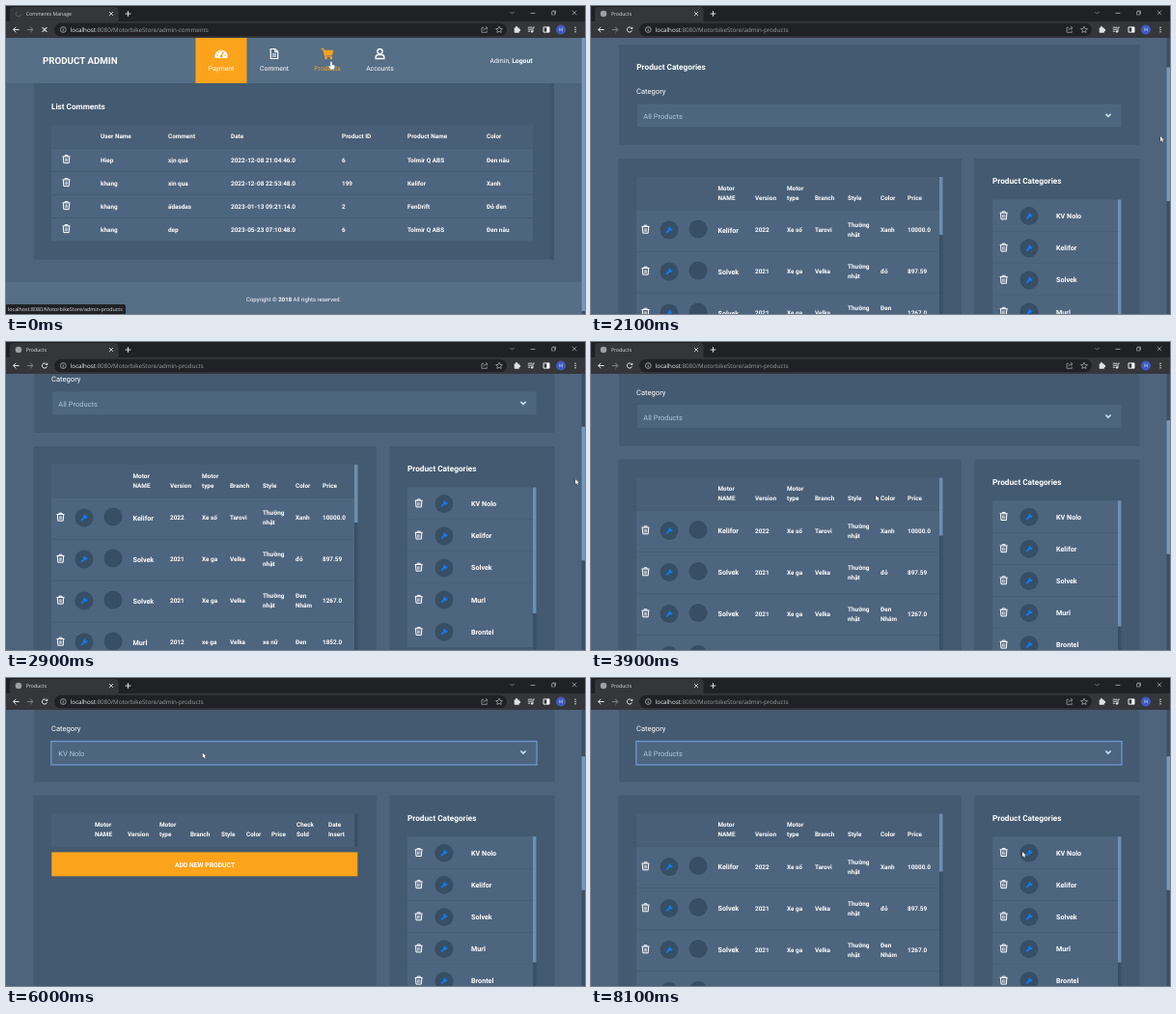
Write an HTML page with a canvas that moves like this. It is 600 by 319 pixels and loops after 8200 ms.

```html
<!DOCTYPE html>
<html lang="en">
<head>
<meta charset="utf-8">
<title>Product admin</title>
<style>
html, body { margin: 0; width: 100%; height: 100%; overflow: hidden; background: #4d647c; }
canvas { display: block; width: 600px; height: 319px; }
</style>
</head>
<body>
<canvas id="stage"></canvas>
<script>
const W = 600, H = 319, LOOP = 8200, TOP = 33;
const canvas = document.getElementById('stage');
const ctx = canvas.getContext('2d');
const ratio = window.devicePixelRatio || 1;
canvas.width = W * ratio;
canvas.height = H * ratio;
ctx.textRendering = 'geometricPrecision';

const C = {
  page: '#4d647c', block: '#435a70', nav: '#566e86', row: '#4e657f', head: '#485f77',
  line: '#435a72', disc: '#384e64', thumb: '#6d8fb0', track: '#3a5066', pageThumb: '#7699be',
  orange: '#fca31c', blue: '#0d7df2', pale: '#acc6de', white: '#ffffff',
  strip: '#202124', bar: '#35363a', grey: '#9aa0a6', dim: '#b4b7bb', light: '#dfe1e5'
};
const ROBOTO = 'Roboto, sans-serif', OPEN = '"Open Sans", sans-serif';

const options = ['All Products', 'KV Nolo', 'Kelifor', 'Solvek', 'Murl', 'Brontel',
  'FenDrift', 'Plyma', 'Zunel', 'Kelifor TZ', 'Tolmir Q ABS', 'KV'];
const bikes = [
  ['Kelifor', '2022', 'Xe số', 'Tarovi', 'Thường|nhật', 'Xanh', '10000.0'],
  ['Solvek', '2021', 'Xe ga', 'Velka', 'Thường|nhật', 'đỏ', '897.59'],
  ['Solvek', '2021', 'Xe ga', 'Velka', 'Thường|nhật', 'Đen|Nhám', '1267.0'],
  ['Murl', '2012', 'xe ga', 'Velka', 'xe nữ', 'Đen', '1852.0']
];
const comments = [
  ['Hiep', 'xịn quá', '2022-12-08 21:04:46.0', '6', 'Tolmir Q ABS', 'Đen nâu'],
  ['khang', 'xin qua', '2022-12-08 22:53:48.0', '199', 'Kelifor', 'Xanh'],
  ['khang', 'ấdasdas', '2023-01-13 09:21:14.0', '2', 'FenDrift', 'Đỏ đen'],
  ['khang', 'dep', '2023-05-23 07:10:48.0', '6', 'Tolmir Q ABS', 'Đen nâu']
];
const heads = ['Motor|NAME', 'Version', 'Motor|type', 'Branch', 'Style', 'Color', 'Price'];
const fullCols = [131.5, 170, 203, 232, 266, 300, 328];
const emptyCols = [92, 126, 159, 191, 223, 249, 275, 301, 334];
const commentCols = [98, 168, 233, 348, 416, 498];

// Keyframes: [time, value, ...]
const scrollKeys = [[1400, 0], [2100, 63], [2600, 113], [2900, 113], [3300, 99.4]];
const mouseKeys = [
  [0, 337, 58], [300, 345, 62], [1200, 590, 94], [1500, 590, 94], [2100, 590, 135],
  [2900, 590, 142], [3600, 330, 276], [4100, 272, 81], [4500, 272, 81], [5000, 288, 165],
  [5300, 287.5, 165], [5600, 204, 104], [5900, 203.7, 77.5], [6300, 203.7, 77.5],
  [6900, 130, 93], [7100, 130, 93], [7800, 440, 180], [8100, 447, 180]
];

function sample(keys, t) {
  if (t <= keys[0][0]) return keys[0].slice(1);
  for (let i = 1; i < keys.length; i++) {
    const a = keys[i - 1], b = keys[i];
    if (t <= b[0]) {
      const p = (t - a[0]) / (b[0] - a[0]);
      return a.slice(1).map((v, k) => v + (b[k + 1] - v) * p);
    }
  }
  return keys[keys.length - 1].slice(1);
}

function box(x, y, w, h, color) {
  ctx.fillStyle = color;
  ctx.fillRect(x, y, w, h);
}

function round(x, y, w, h, r, color) {
  ctx.fillStyle = color;
  ctx.beginPath();
  ctx.roundRect(x, y, w, h, r);
  ctx.fill();
}

function disc(x, y, r, color) {
  ctx.fillStyle = color;
  ctx.beginPath();
  ctx.arc(x, y, r, 0, 7);
  ctx.fill();
}

function ring(x, y, r, color, width = 0.9, from = 0, to = Math.PI * 2) {
  ctx.strokeStyle = color;
  ctx.lineWidth = width;
  ctx.beginPath();
  ctx.arc(x, y, r, from, to);
  ctx.stroke();
}

function path(d, x, y, color, width = 0) {
  ctx.save();
  ctx.translate(x, y);
  const p = new Path2D(d);
  if (width) {
    ctx.strokeStyle = color;
    ctx.lineWidth = width;
    ctx.stroke(p);
  } else {
    ctx.fillStyle = color;
    ctx.fill(p);
  }
  ctx.restore();
}

// y is the middle of the capital letters
function text(s, x, y, size, opt = {}) {
  ctx.font = `${opt.weight || 400} ${size}px ${opt.font || ROBOTO}`;
  ctx.fillStyle = opt.color || C.white;
  ctx.textAlign = opt.align || 'left';
  ctx.fillText(s, x, y + size * 0.355);
  return ctx.measureText(s).width;
}

const bold = (s, x, y, size = 6.4, align = 'left') => text(s, x, y, size, { weight: 700, align });

function lines(s, x, y, size) {
  const parts = s.split('|');
  parts.forEach((p, i) => bold(p, x, y + (i - (parts.length - 1) / 2) * 10, size));
}

function trash(x, y) {
  path('M-3.2-2.4L-2.7 4H2.7L3.2-2.4M-4-2.7H4M-1.5-2.9V-4H1.5V-2.9', x, y, C.white, 1);
  path('M-1.2-1V2.7M0-1V2.7M1.2-1V2.7', x, y, C.white, 0.6);
}

function wrench(x, y) {
  disc(x, y, 9.5, C.disc);
  path('M-2.9 2.9L1.2-1.2', x, y, C.blue, 1.7);
  path('M3.3-1.7A2.1 2.1 0 1 1 1.7-3.3L1.3-1.9L1.9-1.3Z', x, y, C.blue);
}

function drawNav(hover, y) {
  box(0, y, W, 47, C.nav);
  bold('PRODUCT ADMIN', 38, y + 24, 9.75);
  box(196.5, y, 53, 47, C.orange);
  const hot = hover ? C.orange : C.white;
  const iy = y + 16.5;

  path('M-6.3 4.5A6.6 6.6 0 1 1 6.3 4.5Z', 223, iy, C.white);
  [[-4, 1.5], [-2.9, -1.8], [0, -3.2], [4, 1.5]].forEach(p => disc(223 + p[0], iy + p[1], 0.8, C.orange));
  path('M0 2.4L2.4-2.2', 223, iy, C.orange, 1.1);
  disc(223, iy + 2.6, 1.5, C.orange);

  path('M-3.7-5H1L3.7-2.3V5H-3.7ZM0.8-5V-2H3.7', 278, iy, C.white, 1.2);
  path('M-2 0.4H2M-2 2.5H2', 278, iy, C.white, 1);

  path('M-6.3-5H-4.2L-2.2 2.7H4.6', 333, iy, hot, 1.3);
  path('M-4-3.8H6.3L5 1.5H-2.8Z', 333, iy, hot);
  disc(331.6, iy + 4.4, 1.3, hot);
  disc(337, iy + 4.4, 1.3, hot);

  ring(387.5, iy - 2.4, 2.6, C.white, 1.3);
  path('M-4.4 5V3.8C-4.4 2-3.2 1-1.7 1H1.7C3.2 1 4.4 2 4.4 3.8V5Z', 387.5, iy, C.white, 1.3);

  const label = (s, x, color) => text(s, x, y + 32, 6.8, { align: 'center', color });
  label('Payment', 223, C.white);
  label('Comment', 278, C.white);
  label('Products', 333, hot);
  label('Accounts', 387.5, C.white);
  const w = text('Admin, ', 501.5, y + 24, 6.8);
  bold('Logout', 501.5 + w, y + 24, 6.8);
}

function drawComments() {
  drawNav(true, TOP);
  box(29, 80, 539, 182.5, C.block);
  box(564, 80, 4, 182.5, '#3e556b');
  bold('List Comments', 47, 104, 8.2);
  box(47, 123, 499, 24.5, C.head);
  ['User Name', 'Comment', 'Date', 'Product ID', 'Product Name', 'Color']
    .forEach((s, i) => bold(s, commentCols[i], 135));
  comments.forEach((row, r) => {
    const y = 159.3 + r * 24;
    box(47, y - 12, 499, 24, C.row);
    box(47, y - 12.2, 499, 0.7, C.line);
    trash(62.5, y - 0.7);
    row.forEach((s, i) => bold(s, commentCols[i], y));
  });
  box(0, 286, W, 33, C.nav);
  let x = 249;
  x += text('Copyright © ', x, 303.5, 6);
  x += text('2018', x, 303.5, 6, { weight: 700 });
  text(' All rights reserved.', x, 303.5, 6);
  box(596.5, TOP, 3.5, 286, C.track);
  box(596.5, TOP, 3.5, 283, C.pageThumb);
}

function drawSelect(s, value, focused) {
  const y = 164.5 - s;
  box(48, y, 501.5, 23.7, C.row);
  if (focused) {
    ctx.strokeStyle = '#7199d2';
    ctx.lineWidth = 1.3;
    ctx.strokeRect(46.8, y + 0.5, 503.2, 24.3);
  }
  text(value, 54.3, y + 12.8, 7.5, { color: C.pale });
  path('M-2.6-1.3L0 1.3L2.6-1.3', 536, y + 11.7, '#d5e3ef', 1.5);
}

function drawHeads(names, cols, s) {
  box(47, 240 - s, 314, 34.5, C.head);
  names.forEach((name, i) => {
    const parts = name.split('|');
    parts.forEach((p, k) => bold(p, cols[i], 261.5 - s - (parts.length - 1 - k) * 10));
  });
}

function drawBikes(s) {
  drawHeads(heads, fullCols, s);
  bikes.forEach((row, r) => {
    const y = 295 - s + r * 43;
    box(47, y - 21, 314, 43, C.row);
    box(47, y - 21.2, 314, 0.7, C.line);
    trash(56.5, y - 0.8);
    wrench(81, y);
    disc(111, y - 1, 9.5, C.disc);
    row.forEach((v, i) => lines(v, fullCols[i], y, i ? 6.4 : 7.2));
  });
  box(361, 240 - s, 3.5, 260, C.track);
  box(361, 240 - s, 3.5, 60, C.thumb);
}

function drawEmpty(s) {
  drawHeads(heads.concat('Check|Sold', 'Date|Insert'), emptyCols, s);
  box(361, 240 - s, 3.5, 34.5, C.track);
  box(47.3, 279.8 - s, 317, 24.9, C.orange);
  bold('ADD NEW PRODUCT', 206, 292.5 - s, 6.8, 'center');
}

function drawList(choice) {
  box(47.5, 89.7, 502, 112.5, C.row);
  options.forEach((name, i) => {
    const y = 93.8 + i * 9.38;
    if (i === choice) box(47.5, y - 4.7, 502, 9.4, '#1887f5');
    text(name, 55, y, 7.5, { color: i === choice ? C.white : '#bdd1e3' });
  });
}

function drawProducts(t) {
  const s = sample(scrollKeys, t)[0];
  const filtered = t >= 5800 && t < 7200;
  const chosen = t >= 5600 && t < 6900 ? options[1] : options[0];
  drawNav(false, TOP - s);

  box(29, 103 - s, 539.5, 104, C.block);
  bold('Product Categories', 47.3, 126.5 - s, 8.24);
  text('Category', 47, 151.5 - s, 7.6);
  drawSelect(s, chosen, t >= 4300);

  box(28.5, 221 - s, 355.5, 320, C.block);
  if (filtered) drawEmpty(s); else drawBikes(s);

  box(397.5, 221 - s, 171, 320, C.block);
  bold('Product Categories', 416, 244.5 - s, 8.24);
  options.slice(1, 6).forEach((name, i) => {
    const y = 280.6 - s + i * 33.15;
    box(416, y - 17, 130, 33.2, C.row);
    box(416, y + 15.9, 130, 0.7, C.line);
    trash(427.7, y - 0.7);
    wrench(454, y);
    bold(name, 482, y, 7.2);
  });
  box(546, 263.5 - s, 3.5, 240, C.track);
  box(546, 263.5 - s, 3.5, 130.5, C.thumb);

  if (t >= 4500 && t < 5600) drawList(t < 5100 ? 0 : 1);
  if (t >= 6300 && t < 6900) drawList(t < 6600 ? 1 : 0);

  box(596.5, TOP, 3.5, 286, C.track);
  box(596.5, TOP + s * 0.485, 3.5, 138.5, C.pageThumb);
}

function drawBrowser(t, loading) {
  box(0, 0, W, 16, C.strip);
  round(4, 1, 112.5, 18, 4, C.bar);
  box(0, 16, W, 17, C.bar);
  if (loading) ring(13, 8, 2.8, '#5f6368', 0.8, t / 90, t / 90 + 4);
  else disc(13, 8, 3.3, C.grey);
  text(loading ? 'Comments Manage' : 'Products', 20.7, 8.2, 5.2, { font: OPEN, color: C.light });
  path('M-1.9-1.9L1.9 1.9M1.9-1.9L-1.9 1.9', 109, 8, C.light, 0.9);
  path('M-2.8 0H2.8M0-2.8V2.8', 126.5, 8, C.light, 1);

  path('M-2.2-1.1L0 1.1L2.2-1.1', 524.5, 7, C.grey, 0.7);
  path('M-2.4 0H2.4', 546, 7.4, C.dim, 0.8);
  path('M-2-1.2H1.2V2H-2ZM-1-1.2V-2H2V1H1.2', 567.5, 7, C.dim, 0.6);
  path('M-2.2-2.2L2.2 2.2M2.2-2.2L-2.2 2.2', 589, 7, C.dim, 0.7);

  path('M3 0H-2.8M-0.2-2.7L-2.9 0L-0.2 2.7', 10.5, 24.5, C.light, 1);
  path('M-3 0H2.8M0.2-2.7L2.9 0L0.2 2.7', 25, 24.5, '#80848a', 1);
  if (loading) path('M-2.4-2.4L2.4 2.4M2.4-2.4L-2.4 2.4', 40, 24.5, C.light, 1.1);
  else {
    ring(40, 24.5, 2.6, C.light, 1, 0.3, 5.4);
    path('M0.6-0.6H3.2V-3.2Z', 40, 24.5, C.light);
  }

  round(50, 17.8, 469, 13.4, 6.7, C.strip);
  ring(59.3, 24.5, 2.9, C.dim, 0.8);
  path('M0-0.4V1.7M0-1.7V-0.9', 59.3, 24.5, C.dim, 0.8);
  const url = { font: OPEN, color: '#f1f3f4' };
  const w = text('localhost', 66.8, 24.5, 6.22, url);
  url.color = C.grey;
  text(':8080/MotorbikeStore/admin-' + (loading ? 'comments' : 'products'), 66.8 + w, 24.5, 6.22, url);

  path('M-1-2.2H-3V2.8H2.3V1M-1.2 0.8C-0.8-1 0.4-1.6 2.8-1.6M1.2-3.3L3-1.6L1.2 0', 496, 24.5, C.grey, 0.8);
  path('M0-3.4L1-1.1L3.4-0.9L1.6 0.7L2.1 3L0 1.8L-2.1 3L-1.6 0.7L-3.4-0.9L-1-1.1Z', 511, 24.5, C.dim, 0.7);
  round(526.7, 22.5, 5.2, 5.2, 0.7, C.light);
  disc(529, 22.1, 1.2, C.light);
  disc(532, 25, 1.2, C.light);
  path('M-3.2-2.3H1.2M-3.2-0.3H1.2M-3.2 1.7H-0.7M2 1.8V-2.3H3.8', 544, 24.5, C.light, 0.9);
  disc(545.1, 26.4, 1.2, C.light);
  path('M-3-2.6H3V2.6H-3Z', 560, 24.5, C.white, 0.9);
  box(560.3, 21.9, 2.7, 5.2, C.white);
  disc(575, 24.5, 5, '#3f5abf');
  text('H', 575, 24.5, 5, { align: 'center' });
  [-2.3, 0, 2.3].forEach(d => disc(590, 24.5 + d, 0.75, C.light));
}

function drawMouse(t) {
  const [x, y] = sample(mouseKeys, t);
  if (t < 300) {
    path('M-0.8 0Q0-0.9 0.8 0V2.7L3.2 3.5Q3.8 3.8 3.5 5L2.8 7.5H-0.8L-2.7 4.5Q-2.5 3.7-1.6 4.2L-0.8 4.8Z', x, y, C.white);
    return;
  }
  const arrow = 'M0 0V5.2L1.2 4.1L2 6L3 5.6L2.2 3.7H3.8Z';
  path(arrow, x, y, '#1c242d', 0.8);
  path(arrow, x, y, C.white);
}

function draw(now) {
  const t = Math.floor((now % LOOP) / 100) * 100;
  const loading = t < 400;
  ctx.setTransform(ratio, 0, 0, ratio, 0, 0);
  box(0, 0, W, H, C.page);
  if (loading) drawComments(); else drawProducts(t);
  drawBrowser(t, loading);
  if (t < 300) {
    round(-3, 309, 127, 13, 2, C.strip);
    text('localhost:8080/MotorbikeStore/admin-products', 2, 314.3, 5.36, { font: OPEN, color: C.light });
  }
  drawMouse(t);
}

const start = performance.now();
function tick() {
  draw(performance.now() - start);
  requestAnimationFrame(tick);
}
tick();
</script>
</body>
</html>
```
